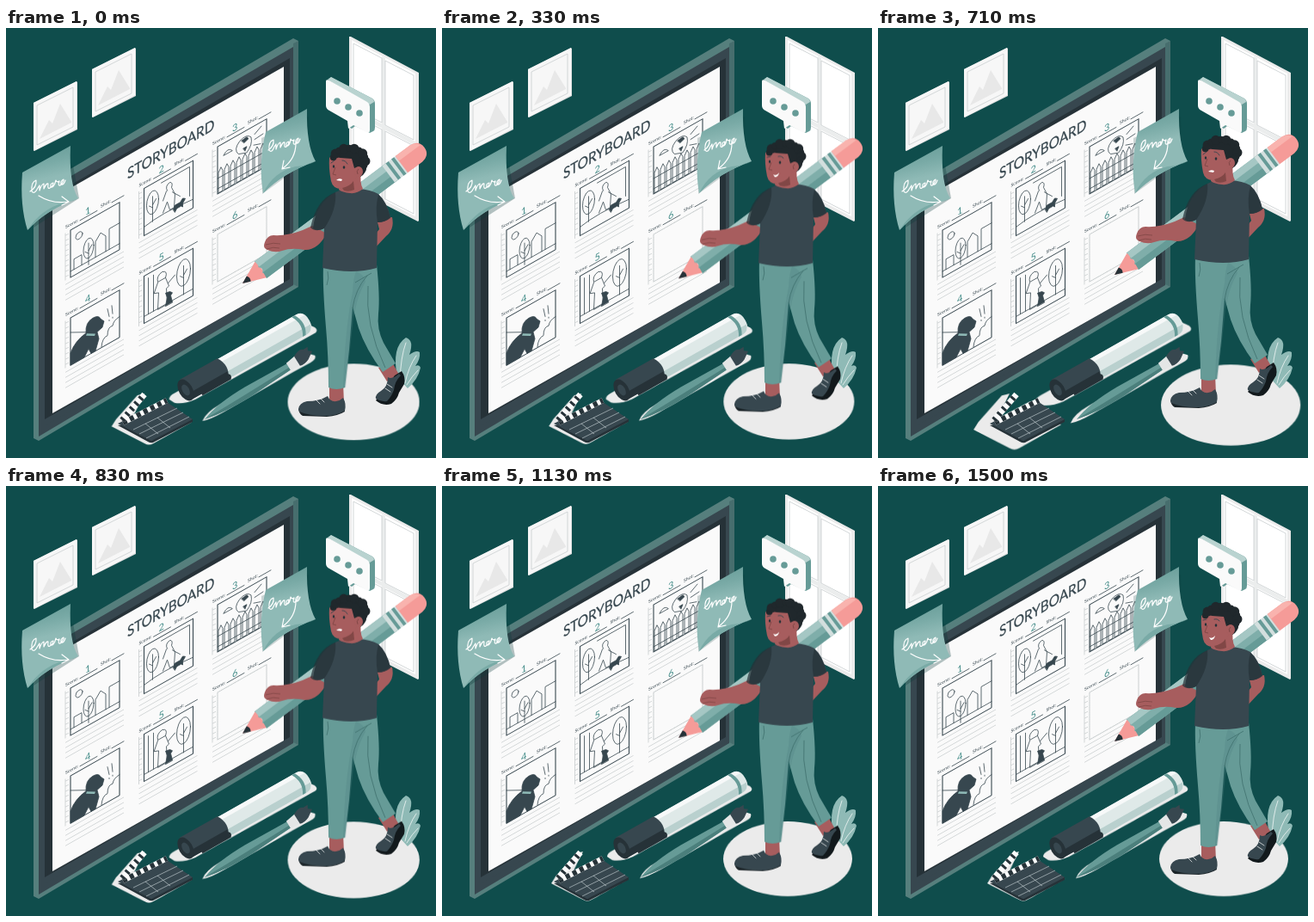
Animation, 500 px wide and 500 px high, one loop 1.54 s. Source, as an HTML page:

```html
<!DOCTYPE html>
<html lang="en">
<head>
<meta charset="utf-8">
<title>Storyboard</title>
<style>
html,body{margin:0;width:100%;height:100%;overflow:hidden;background:#0f4d4c}
svg{display:block;width:100vw;height:100vh}
text{font-family:Lato,sans-serif;fill:#37474f}
.ink{fill:none;stroke:#37474f;stroke-width:.9;stroke-linecap:round;stroke-linejoin:round}
.thin{fill:none;stroke:#c8cdce;stroke-width:.8}
.pen{fill:none;stroke:#fff;stroke-width:1.2;stroke-linecap:round;stroke-linejoin:round}
.fine{stroke-width:.7}
.dark{fill:#37474f}.black{fill:#263238}.teal{fill:#669b97}.pale{fill:#8fbab6}
.skin{fill:#a75d5e}.white{fill:#fafafa}.back{fill:#ebebeb}
</style>
</head>
<body>
<svg viewBox="0 0 500 500">
<rect width="500" height="500" fill="#0f4d4c"/>

<defs>
 <g id="picture">
  <path d="M0 25L50 0l1 1v55L1 81z" fill="#e0e0e0"/>
  <path d="M0 25L50 0v55L0 81z" fill="#f7f7f7"/>
  <path class="thin" d="M4 28L46 7v46L4 74z"/>
  <path d="M7 67L18 45l4 4 9-23 13 21v1z" fill="#e8e8e8"/>
 </g>
 <linearGradient id="sticky" x1=".3" y1="0" x2=".45" y2="1">
  <stop offset="0" stop-color="#669b97"/><stop offset=".22" stop-color="#79aaa6"/><stop offset=".4" stop-color="#8fbab6"/><stop offset="1" stop-color="#8fbab6"/>
 </linearGradient>
</defs>
<use href="#picture" x="32" y="62"/>
<use href="#picture" x="100" y="23"/>

<!-- window -->
<path d="M399 10l2 0 79 42v172l-1 1-80-41z" fill="#ebebeb"/>
<path d="M402 14l74 39v166l-74-38z" fill="#fff"/>
<path d="M437 33l4 2v167l-4-2zM402 93l74 39v5l-74-39z" fill="#ebeded"/>
<path class="thin" d="M404 18l33 17v75l-33-17zM441 38l33 17v75l-33-17zM404 101l33 17v80l-33-17zM441 120l33 17v79l-33-17z"/>

<!-- speech bubble -->
<path class="teal" d="M374 60l4-3 48 25q3 2 3 6v28q0 3-2 4l-4 2-17-8-4 3-3-2 2-40z"/>
<path d="M374 60l4-3 48 25q2 1 2 4l-5 3z" fill="#b9d3d0"/>
<path class="white" d="M372 62q0-3 4-1l44 25q3 2 3 6v27q0 4-4 2l-15-8-6 4-1-9-21-12q-4-2-4-6z"/>
<g class="teal"><circle cx="385" cy="85" r="3.8"/><circle cx="398" cy="92" r="3.8"/><circle cx="411" cy="99" r="3.8"/></g>

<!-- board -->
<path d="M32 189L334 12l6 3v286L38 480l-6-3z" fill="#567f7d"/>
<path d="M334 18l6-3v286l-6-3z" fill="#476e6e"/>
<path class="dark" d="M38 194L334 22v277L38 475z"/>
<path class="black" d="M45 200L330 35v261L45 462z"/>
<path class="dark" d="M45 455L330 292v5L45 463z"/>
<path class="white" d="M54 198L323 45v251L54 448z"/>
<text font-size="17.600" transform="matrix(.87 -.5 0 1 141 176)" stroke="#37474f" stroke-width=".25">STORYBOARD</text>
<g id="panels"></g>

<!-- sticky notes -->
<path d="M33 174L78 160l7 38-53 34z" fill="#0b3938" opacity=".3"/>
<path fill="url(#sticky)" d="M19 168L75 137q-2 44 9 61-37 13-59 37Q16 207 19 168z"/>
<path d="M84 198q-37 13-59 37 16-25 43-32 10-1 16-5z" fill="#79aaa6"/>
<path class="pen" d="M28 190q8-5 7-13-6 2-5 13 3 4 7-4l2-3v6q2-7 5-8v6q3-7 5-6-1 7 2 5 4-2 4-6-4 1-3 5 4 1 6-8 1 3 4 1-2 6 1 5 4-4 4-7-4 2-3 6 3 1 5-5M38 195q16 10 34 7m-7-6l8 6-8 4"/>
<path d="M297 128l55-25 1 50-55 40z" fill="#0b3938" opacity=".2"/>
<path fill="url(#sticky)" d="M302 121l48-27q-1 42 10 61-37 13-61 37-6-34 3-71z"/>
<path d="M360 155q-37 13-61 37 12-25 38-31 14-1 23-6z" fill="#79aaa6"/>
<path class="pen" d="M305 142q7-5 6-12-6 2-5 12 3 4 6-4l2-3v6q2-7 5-8v6q3-7 5-6-1 7 2 5 3-2 3-6-4 1-3 5 4 1 5-8 1 3 4 1-2 6 1 5 4-4 4-7-4 2-3 6 3 1 5-5M337 134q0 18-15 29m1-9l-2 10 9-2"/>

<!-- floor shapes -->
<ellipse id="disc" class="back" cx="402" cy="433.5" rx="75" ry="43.5"/>
<path id="markerBack" class="back" d="M192 431q0-4 6-7L345 343l13 6q4 3 1 6L222 431q-14 6-24 4z"/>
<path id="brushBack" class="back" d="M230 456q4-10 20-19l82-46 20-12 7 2q2 4-5 8l-20 11-80 46q-16 9-24 10z"/>
<path id="clapBack" class="back" d="M127 462l5-8 24-27 8-2-13 26 34-18 8 8 24 16-43 24q-5 3-10 0z"/>

<!-- marker -->
<g transform="translate(209 421) rotate(-29.500)">
 <path d="M44-13H155q10 0 10 13t-10 13H44z" fill="#dfe9e8"/>
 <path d="M44-13H155q5 0 8 5H44z" fill="#f7f9f9"/>
 <path d="M44 5H164q-3 8-9 8H44z" fill="#b9d0ce"/>
 <path d="M149-13h4q8 13 0 26h-4q8-13 0-26z" class="teal"/>
 <path class="dark" d="M0-14H50q9 13 0 27H0z"/>
 <path class="black" d="M8 5H53l-3 8H0zM14 8h38q4 3 0 7H14z"/>
 <ellipse class="black" rx="8" ry="13.500"/><ellipse class="dark" rx="4" ry="7"/>
</g>
<!-- brush -->
<g transform="translate(231 455) rotate(-32)">
 <path class="teal" d="M0 0Q22-8 60-7L117-4v8L60 6Q25 6 0 0z"/>
 <path d="M0 0q30 1 117 1v3L60 6Q25 6 0 0z" fill="#4b7f7c"/>
 <path d="M115-5l13-2v13l-13-1z" fill="#e4e6e6"/>
 <path class="dark" d="M127-7q10-5 13-1l6 0-2 4 4 3-9 6q-7 3-12 1z"/>
</g>
<!-- clapperboard -->
<path class="black" d="M130 462l87-7v3l-46 24q-3 1-6-1z"/>
<path class="dark" d="M130 460l54-27 33 22-48 25z"/>
<path d="M136 459L187 433" stroke="#fafafa" stroke-width="6"/>
<path d="M136 459L187 433" stroke="#263238" stroke-width="6" stroke-dasharray="5 4"/>
<path d="M135 456L161 426" stroke="#fafafa" stroke-width="7"/>
<path d="M135 456L161 426" stroke="#263238" stroke-width="7" stroke-dasharray="3 5"/>
<path d="M148 467l51-25M155 472l51-25M163 477l50-25M162 460l15 12M176 453l15 12" fill="none" stroke="#cfd8dc" stroke-width=".6"/>

<!-- plant -->
<path class="pale" d="M455 406q-7-35 10-46 10 3 4 20 8-6 12-3 1 8-5 16 5-2 6 2-3 14-15 24z"/>
<path class="pen fine" d="M458 410q1-28 7-44M464 413q4-19 13-32M466 415q6-10 13-17"/>

<!-- man -->
<g id="man">
 <path class="skin" d="M431 222l18-2q3 14-7 22l-15 16-4-10 11-14z"/>
 <g transform="translate(275 297) rotate(-36.800)">
  <path d="M0 0L28-12v24z" fill="#f59b98"/>
  <path class="black" d="M0 0l9-4q3 4 0 8z"/>
  <path d="M26-12H218v24H26q5-4 0-8 5-4 0-8 4-4 0-8z" fill="#7faeaa"/>
  <path d="M27-12H218v8H27z" fill="#a5c7c4"/><path class="teal" d="M27 4H218v8H26z"/>
  <path d="M212-12h20v24h-20z" fill="#d3dfde"/>
  <path d="M217-12h4v24h-4zM225-12h4v24h-4z" class="teal"/>
  <path d="M231-12h21q12 1 12 12t-12 12h-21z" fill="#f59b98"/>
  <path d="M231-12h21q7 1 10 7h-31z" fill="#f9b3ae"/>
 </g>
 <!-- shoes and ankles -->
 <path class="skin" d="M376 412h16l1 24-17 2zM433 395l15-8 9 16-14 8z"/>
 <path d="M340 443q1 6 5 8l28 1q13-1 21-6l-1-5z" fill="#1c2529"/>
 <path class="dark" d="M340 443q1-7 10-9 14 0 24-6 3 7 10 6 5-1 8-4 4 7 2 15-10 6-23 6-19 0-30-5z"/>
 <path class="pen fine" d="M360 432l5 5M365 430l5 5"/>
 <path d="M430 433q8 7 18 4 7-5 9-13l6-10q2-8-3-15l-8 5z" fill="#12191c"/>
 <path class="dark" d="M430 431q-1-5 6-9 8-5 8-16 5 3 13-4l2 2q-7 7-8 17-3 8-8 13-7 1-13-3z"/>
 <path class="pen fine" d="M441 419l6 4M443 414l6 4"/>
 <!-- trousers -->
 <path class="teal" d="M369 275h62q4 37 2 57-2 18 6 34l14 24-15 10q-20-27-28-51l-7-25-4 50-5 44q-10 4-19 0 0-36-3-70-4-47-3-73z"/>
 <path d="M407 283q10 4 11 12-9 16-12 33l-2 8-4 38-5 44-3 1q2-69 11-112 1-17 4-24z" fill="#4f8380" opacity=".3"/>
 <path d="M374 283q2 8-1 16M425 285q-14 8-19 11M420 288q-14 16-17 38M421 300q-4 45 20 95" fill="none" stroke="#3f706e" stroke-width=".8"/>
 <!-- drawing arm -->
 <path class="skin" d="M356 230l17 9q-11 20-26 19-15-3-26 1-8 3-17-1-6-2-3-9 3-8 10-8 16 1 34-6z"/>
 <path d="M302 252q9-3 17-1M303 257q8-3 15-1" fill="none" stroke="#814746" stroke-width=".8"/>
 <!-- shirt -->
 <path class="dark" d="M383 191q10-5 27-4 14 1 23 6 10 9 14 27-6 6-15 6l-1 53q-28 8-63 0l2-46q-8 4-13 0 3-29 26-42z"/>
 <path class="black" d="M383 191q2 20-13 42-10 5-16-1 7-33 29-41zM433 194q10 9 14 27-6 5-15 5-3-18 1-32z" opacity=".72"/>
 <!-- head -->
 <path class="skin" d="M391 164h22q-2 17 2 23-7 6-15 5-9-1-13-4z"/>
 <path class="skin" d="M376 151q10-12 28-6 8 9 4 26-4 15-18 16-10 0-12-9-3-15-2-27z"/>
 <path d="M391 186q9-2 13-8l1 10q-6 3-12 1z" fill="#814746"/>
 <g id="curls" fill="#20282c"></g>
 <ellipse class="skin" cx="410" cy="167" rx="5" ry="6"/>
 <path d="M410 164q-3 2-1 6" fill="none" stroke="#814746"/>
 <g class="black"><ellipse cx="381" cy="161" rx="1.200" ry="1.700"/><ellipse cx="393" cy="162" rx="1.300" ry="1.800"/></g>
 <path d="M383 162l-3 8 4 1" fill="none" stroke="#814746" stroke-width=".9"/>
 <g id="smile"><path d="M385 176q4 2 7-2-1 5-5 5z" fill="#fff"/><path class="ink" d="M378 156l4-1M391 155q4-1 6 2"/></g>
 <g id="frown"><path d="M384 177q3-3 7-1l-1 2z" fill="#fff"/><path class="ink" d="M378 157l4-3M391 154q4 0 6 4"/></g>
</g>
</svg>
<script>
const $ = id => document.getElementById(id);
const LOOP = 1540;

// Drawings in skewed panel space, 57 by 55
const tree = (x, y, r) => `<ellipse cx="${x}" cy="${y}" rx="${r}" ry="${r * 1.9}"/><path d="M${x} ${y - r}V${y + r * 3.2}M${x} ${y + 6}l-4-4m4 1l4-5"/>`;
const fence = Array.from({length: 8}, (_, i) => `<path fill="#fafafa" d="M${i * 7 + 1} 54V31l3-5 2 5V54z"/>`).join('');
const art = [
  `<circle cx="10" cy="12" r="4"/>${tree(21, 33, 6)}<path d="M0 48H57M4 48V36h9v12M29 48V30l6-7 6 7v18M45 48V24h12"/>`,
  `${tree(10, 22, 7)}<path d="M0 45q20-5 57 0M20 5H53V39M27 18q-3-7 3-8 4 2 2 7l4 10-1 15h-5l-3-11-5 10m4-23l-4 9M33 23l9 10"/><path class="dark" d="M34 44l2-4h6l3-3 3 2-3 4v4l-2-2h-5l-2 3z"/>`,
  `${fence}<path d="M0 37H57M0 49H57M24 22q-6-8 2-14 8-4 13 3 2 10-5 15zM43 10l8-5M43 16l10-1M42 22l8 3M7 14q5-7 10 0z"/><path class="dark" d="M28 9l6-1 2 3-5 2zM30 19h4l-2 4z"/>`,
  `<path d="M0 17l20 11M36 54q1-10 7-9 0-10 6-8 1-6 8-6M43 14l2 10m0 4v1M48 13l1 10m0 4v1"/><path class="dark" d="M0 55V41Q5 30 18 28 17 15 26 15q7 0 9 6l4 5-2 6-6 2 2 9-4 12h-5l-3-7-5 7z"/><path fill="#8fbab6" stroke="none" d="M19 29l10 6-1 2-10-6z"/>`,
  `${tree(46, 22, 8)}<path d="M0 47H57M16 16q-2-8 5-9 7 2 4 9l4 12-3 1 1 19H16l1-19-5-2zM17 16h8M28 24l8-5M5 5V47M11 5V47"/><path class="dark" d="M25 49l2-9-2-6 5 1 3 3-2 2 2 9z"/>`,
  ''
];

function panel(i) {
  const col = i % 3, row = i / 3 | 0;
  const rows = [60, 66, 72, 78].map(y => `M-6 ${y}H62`).join('');
  const ticks = Array.from({length: 9}, (_, n) => `M-6 ${n * 6 + 3}h4`).join('');
  const tint = i == 5 ? '#c8cdce' : '#37474f';
  return `<g transform="matrix(1 -.567 0 1 ${75 + col * 85.5} ${235 + row * 102 - col * 48.5})">
    <path class="thin" d="${rows}${ticks}M-6 0V55"/>
    <rect class="ink" width="57" height="55" style="stroke:${tint};stroke-width:1.1"${i == 5 ? ' stroke-dasharray="1 1"' : ''}/>
    <g class="ink fine">${art[i]}</g>
    <text font-size="5.200" x="-6" y="-5">Scene:</text><text font-size="5.200" x="35" y="-6">Shot:</text>
    <text font-size="11" x="17" y="-7" style="fill:#438c88">${i + 1}</text>
    <path class="ink fine" d="M11-5H31M48-5H62"/></g>`;
}
$('panels').innerHTML = art.map((_, i) => panel(i)).join('');

// Hair: a cap edged with curls
let hair = '<path d="M378 149Q384 136 400 138q20 2 20 19-1 13-8 16l-2-12-5 2-3-11q-12 0-24-3z"/>';
for (let i = 0; i < 12; i++) {
  const a = Math.PI * (1.08 + i / 9.6);
  hair += `<circle cx="${399 + 19 * Math.cos(a)}" cy="${154 + 14.5 * Math.sin(a)}" r="${3.8 + i % 2 * 1.7}"/>`;
}
$('curls').innerHTML = hair;

const play = (id, frames) => $(id).animate(frames, {duration: LOOP, iterations: Infinity});

// Rise and fall: [ms, y]
play('man', [[0, 0], [100, -1.2], [210, -3.4], [350, -6], [500, -8.3], [620, -9.6], [710, -10], [770, -9.9],
  [830, -9.3], [960, -7.4], [1130, -4.3], [1300, -1.7], [1420, -.4], [1500, 0], [LOOP, 0]]
  .map(([ms, y]) => ({offset: ms / LOOP, transform: `translateY(${y}px)`})));

// Two beats, then rest: [ms, strength]
const beat = [[0, .22], [50, .7], [120, 1], [170, .82], [210, .66], [290, .22], [400, 0], [538, 0]];
const pulse = [...beat, ...beat.map(([ms, k]) => [ms + 540, k]), [LOOP, 0]];
const swell = (id, x, y, s, ox, oy) => {
  $(id).style.transformOrigin = `${ox}px ${oy}px`;
  play(id, pulse.map(([ms, k]) => ({
    offset: ms / LOOP,
    transform: `translate(${x * k}px,${y * k}px) scale(${1 + s * k})`
  })));
};
swell('disc', 10, 6, .1, 402, 433);
swell('clapBack', -11, 5, .16, 180, 455);
swell('markerBack', -3, 0, .09, 275, 388);
swell('brushBack', -3, 1.5, .07, 295, 418);

const show = (id, steps) => play(id, steps.map(([ms, o]) => ({offset: ms / LOOP, opacity: o, easing: 'steps(1,end)'})));
show('smile', [[0, 0], [90, 1], [600, 0], [960, 1], [LOOP, 1]]);
show('frown', [[0, 1], [90, 0], [600, 1], [960, 0], [LOOP, 0]]);
</script>
</body>
</html>
```
